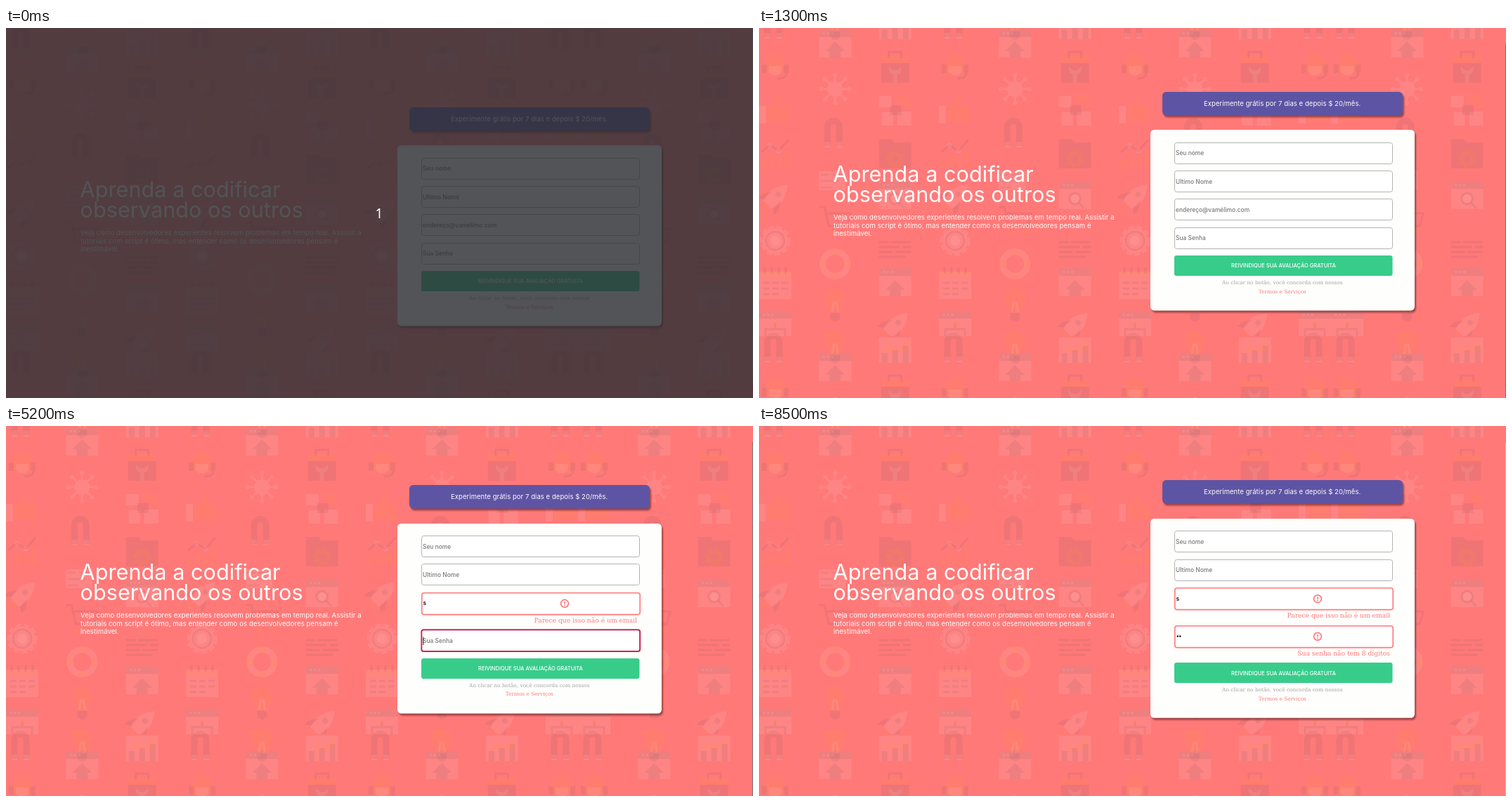
Recreate the animation shown at these times as an HTML page. Size 1063x527 px, loop 9.5 s.

```html
<!DOCTYPE html>
<html lang="pt-BR">
<head>
<meta charset="utf-8">
<title>Formulário de cadastro</title>
<style>
  html, body { margin: 0; width: 100%; height: 100%; overflow: hidden; background: #ff7979; }
  svg { display: block; width: 100vw; height: 100vh; }
  text { font-family: Inter, sans-serif; font-optical-sizing: none; white-space: pre; }
  .serif { font-family: "DejaVu Serif", serif; }
  .title { font-size: 30.6px; letter-spacing: .05px; fill: #fffdfb; }
  .lead { font-size: 9.6px; letter-spacing: .09px; fill: #fffdfb; }
  .offer { font-size: 9.45px; letter-spacing: .09px; fill: #fffdfb; text-anchor: middle; }
  .hint { font-size: 8.35px; font-weight: 500; letter-spacing: .04px; fill: #757575; }
  .typed { font-size: 8.35px; font-weight: 600; fill: #111; }
  .cta { font-size: 7.5px; font-weight: 500; fill: #fff; text-anchor: middle; }
  .terms { font-size: 7.37px; fill: #a3a3a3; text-anchor: middle; }
  .link { fill: #ff7979; }
  .error { font-size: 9.18px; fill: #ff7979; text-anchor: end; }
  .count { font: 19px "Noto Sans", sans-serif; fill: #fff; text-anchor: middle; }
  .shadow { filter: drop-shadow(2.4px 3.4px 1.1px rgba(60, 10, 10, .48)); }
  .line { fill: none; }
  .l { fill: rgba(255, 255, 255, .085); }
  .d { fill: rgba(110, 75, 85, .11); }
  .o { fill: rgba(255, 150, 50, .13); }
  .ls, .ds, .os { fill: none; stroke-width: 3; }
  .ls { stroke: rgba(255, 255, 255, .085); }
  .ds { stroke: rgba(110, 75, 85, .11); }
  .os { stroke: rgba(255, 150, 50, .13); }
  .fat { stroke-width: 9; }
</style>
</head>
<body>
<svg viewBox="0 0 1063 527" preserveAspectRatio="none">
  <defs>
    <pattern id="tile" width="814" height="461" patternUnits="userSpaceOnUse"></pattern>
  </defs>
  <rect width="1063" height="527" fill="#ff7979"/>
  <g id="page">
    <rect width="1063" height="560" fill="url(#tile)"/>
    <text class="title" x="105.5" y="241">Aprenda a codificar</text>
    <text class="title" x="105.5" y="270">observando os outros</text>
    <text class="lead" x="106" y="295">Veja como desenvolvedores experientes resolvem problemas em tempo real. Assistir a</text>
    <text class="lead" x="106" y="306.5">tutoriais com script é ótimo, mas entender como os desenvolvedores pensam é</text>
    <text class="lead" x="106" y="318">inestimável.</text>
  </g>
  <g id="form"></g>
  <rect id="thumb" x="1062" width="1" height="504"/>
  <g id="intro">
    <rect width="1063" height="527" fill="rgb(44,47,52)" fill-opacity=".82"/>
    <text class="count" x="531" y="270.5">1</text>
  </g>
</svg>
<script>
const $ = id => document.getElementById(id);
const shape = (cls, d) => `<path class="${cls}" d="${d}"/>`;
const disc = (cls, x, y, r, extra = '') => `<circle class="${cls}" cx="${x}" cy="${y}" r="${r}" ${extra}/>`;
const text = (cls, x, y, s) => `<text class="${cls}" x="${x}" y="${y}">${s}</text>`;
const box = (x, y, w, h, r, attrs) =>
  `<rect x="${x}" y="${y}" width="${w}" height="${h}" rx="${r}" ${attrs}/>`;

// Faint icons of the wallpaper, each about 46 units wide
const win = shape('l', 'M0 0h46v40H0z') + shape('d', 'M0 0h46v11H0z') +
  [7, 13, 19].map(x => disc('l', x, 5.5, 1.8)).join('');
const rays = [0, 1, 2, 3, 4, 5, 6, 7].map(i => {
  const a = i * Math.PI / 4, c = Math.cos(a), s = Math.sin(a);
  return shape('ls', `M${23 + 11 * c} ${23 + 11 * s}L${23 + 17 * c} ${23 + 17 * s}`) +
    disc('l', 23 + 20 * c, 23 + 20 * s, 3);
}).join('');
const icons = {
  house: win + shape('d', 'M9 31 23 17 37 31h-6v9H15V31z'),
  site: win + shape('ds', 'M23 17v8M9 37V26h28v11') + disc('o', 23, 17, 4),
  lens: win + disc('ds', 23, 25, 8) + shape('ds', 'M29 31l7 8') + disc('l', 23, 25, 6),
  headset: shape('o', 'M8 22a15 18 0 0 1 30 0l-3 10H11z') + shape('l', 'M14 22h18v9q-9 9-18 0z') +
    shape('d', 'M4 20h7v12H4zM35 20h7v12h-7z') + shape('ds', 'M39 32q0 8-13 8'),
  thumb: shape('o', 'M12 20 22 16 26 2q7 0 5 9l-1 7h14v24H12z') + shape('l', 'M0 19h10v25H0z'),
  chart: shape('o', 'M2 32h7v12H2zM14 26h7v18h-7zM26 30h7v14h-7zM37 19h7v25h-7z') +
    shape('ds', 'M3 22 15 12 28 20 42 4') + disc('l', 15, 12, 3.5) + disc('l', 28, 20, 3.5),
  rocket: `<g transform="rotate(45 23 23)">${shape('l', 'M23-2q17 20 8 40H15Q6 18 23-2z')}${
    shape('d', 'M14 20 6 34v8l8-6zM32 20l8 14v8l-8-6z')}${disc('d', 23, 17, 4)}${shape('o', 'M17 39h12l-6 11z')}</g>`,
  bars: shape('l', 'M0 8h46v36H0z') + shape('o', 'M4 30 15 18 26 24 42 8v20H4z') +
    shape('d', 'M4 30h8v14H4zM19 26h8v18h-8zM34 20h8v24h-8z'),
  badge: disc('ls', 23, 23, 20, 'stroke-dasharray="8 4"') + disc('l', 23, 23, 18) +
    disc('ds', 23, 23, 13) + disc('l', 23, 23, 7),
  calendar: shape('l', 'M0 6h46v39H0z') + shape('o', 'M0 6h46v9H0z') + shape('ds', 'M8 0v9M18 0v9M28 0v9M38 0v9') +
    shape('ds', 'M6 22h9m4 0h9m4 0h9M6 30h9m4 0h9m4 0h9M6 38h9m4 0h9'),
  magnet: shape('ds fat', 'M12 41V14a8 8 0 0 1 17 0v27') +
    shape('l', 'M8 35h8v8H8zM25 35h8v8h-8z') + shape('os', 'M5 36l-5 3M6 43l-4 3M36 36l5 3M35 43l4 3'),
  splat: rays + disc('l', 23, 23, 11),
  list: shape('ds', 'M2 3h12m4 0h18M2 12h26M2 21h16') + shape('l', 'M0-2h38v27H0z'),
  cart: shape('ds', 'M0 4h8l6 27h27l5-18H10') + disc('o', 18, 40, 4) + disc('o', 37, 40, 4),
  buoy: disc('ls fat', 23, 23, 17.5) +
    disc('os fat', 23, 23, 17.5, 'stroke-dasharray="13.74" stroke-dashoffset="6.87"'),
  bulb: shape('o', 'M16 34q0-5-5-10a15 15 0 1 1 24 0q-5 5-5 10z') + shape('d', 'M16 35h14v8q-7 8-14 0z') +
    shape('ls', 'M19 33l2-13h4l2 13'),
  tray: shape('l', 'M0 7h46v6H0z') + shape('o', 'M4 4q18-7 22 3H4z'),
  toolbox: shape('ds', 'M14 12V3h18v9') + shape('d', 'M3 19h40v28H3z') + shape('o', 'M3 9h40v10H3z') +
    shape('l', 'M14 24q0 11 6 11v12h6V35q6 0 6-11l-6 5h-6z'),
  papers: shape('l', 'M0 3h18v16H0zM4 26h16v19H4zM26 25h20v20H26z') +
    shape('o', 'M24 2h12q9 4 9 17l-9-4q-8 0-12-13z') + shape('d', 'M16 16h16v14H16z'),
  folder: shape('d', 'M0 2h18l4 5h24v8H0z') + shape('d', 'M0 15h46v29H0z') +
    disc('os', 23, 31, 8, 'style="stroke-width:6"') + disc('os', 23, 31, 12, 'stroke-dasharray="5 4.4"'),
  lines: shape('ds', 'M0 2h14m3 0h28M0 9h30m4 0h12M0 16h20m3 0h23M0 23h38')
};

const columns = [
  'magnet -6 headset 54 thumb 114 chart 177 rocket 240 badge 302 calendar 363 site 425',
  'bulb -8 house 24 splat 86 magnet 149 list 228 cart 273 buoy 335 bulb 393 tray 455',
  'bars -6 toolbox 53 papers 116 folder 178 lens 240 lines 325 house 364 rocket 423'
].map(s => s.match(/[a-z]+ -?\d+/g).map(p => p.split(' ')));

let art = '';
for (let c = 0; c < 10; c++) {
  for (const [name, y] of columns[c % 3]) {
    const put = dy => art += `<g transform="translate(${(c * 256 / 3).toFixed(1)} ${+y + dy})">${icons[name]}</g>`;
    put(0);
    if (y < 0) put(461);
  }
}
$('tile').innerHTML = art;

const HINTS = ['Seu nome', 'Ultimo Nome', 'endereço@vamélimo.com', 'Sua Senha'];
const ERRORS = { 2: 'Parece que isso não é um email', 3: 'Sua senha não tem 8 dígitos' };
const PITCH = 40.35, ERROR_H = 13.2;

// Boxes sit on whole pixels, text does not
function field(i, y, s) {
  const bad = s.bad[i], value = s.value[i], mid = y + 15.7, top = Math.round(y);
  let out = bad
    ? box(591.8, top + .8, 310.4, 30.8, 3, 'fill="#fff" stroke="#ff7979" stroke-width="1.6"')
    : box(591.5, top + .5, 310, 30, 3, 'fill="#fff" stroke="#b3b3b3"');
  if (s.focus === i) {
    const h = bad ? 32 : 31;
    out += box(591.3, top + .3, 310.9, h - .3, 3, 'class="line" stroke="#c9274f" stroke-width="1.9"');
    if (s.tint) out += box(591.9, top + .9, 310.9, h - .3, 3, `class="line" stroke="#5e54a4" stroke-width="1.4" opacity="${s.tint}"`);
  }
  if (!value) out += text('hint', 593, mid + 3, HINTS[i]);
  else if (i === 2) out += text('typed', 593.6, mid + 3, value);
  else for (let k = 0; k < value.length; k++) out += disc('', 595.8 + k * 3.4, mid + .2, 1.25, 'fill="#111"');
  if (s.focus === i && s.caret) {
    const x = value ? (i === 2 ? 598 : 594.5 + value.length * 3.4) : 593.4;
    out += box(x, mid - 5.5, .9, 11.5, 0, 'fill="#111"');
  }
  if (bad) {
    out += disc('line', 795, mid + .4, 5.4, 'stroke="#ff7979" stroke-width="1.7"') +
      `<path d="M795 ${mid - 2.6}v3.8m0 1.1v1.6" stroke="#ff7979" stroke-width="1.6"/>` +
      text('serif error', 898, y + 43.2, ERRORS[i]);
  }
  return out;
}

function formMarkup(s) {
  const errors = s.bad.filter(Boolean).length;
  const base = -s.scroll - errors * ERROR_H / 2;
  const at = y => Math.round(base + y);
  let y = base + 184.6, rows = '';
  for (let i = 0; i < 4; i++) {
    rows += field(i, y, s);
    y += PITCH + (s.bad[i] ? ERROR_H : 0);
  }
  return box(574, at(112.6), 342, 33.5, 5.5, 'fill="#5e54a4" class="shadow"') +
    text('offer', 744.7, base + 132.6, 'Experimente grátis por 7 dias e depois $ 20/mês.') +
    box(557, at(167.4), 376, 257.4 + errors * ERROR_H, 5.5, 'fill="#fefefc" class="shadow"') + rows +
    box(591, Math.round(y), 310.5, 29, 3, 'fill="#38cc8b"') +
    text('cta', 746.5, y + 17.3, 'REIVINDIQUE SUA AVALIAÇÃO GRATUITA') +
    text('serif terms', 744.8, y + 41.1, 'Ao clicar no botão, você concorda com nossos') +
    text('serif terms link', 744.8, y + 53.8, 'Termos e Serviços');
}

const clamp = v => Math.max(0, Math.min(1, v));
const smooth = v => v * v * (3 - 2 * v);

function stateAt(t) {
  const email = t >= 1400 && t < 4200, pass = t >= 5200 && t < 6500;
  const since = email ? t - 1400 : t - 5200;
  return {
    scroll: Math.round(22 * smooth(clamp((t - 400) / 300))),
    focus: email ? 2 : pass ? 3 : -1,
    tint: +clamp(since / 300).toFixed(2),
    caret: email ? t >= 1700 && t < 2500 || t >= 3200 : t < 6400,
    value: ['', '', t >= 3200 ? 's' : '', t >= 6200 ? '••' : t >= 6000 ? '•' : ''],
    bad: [false, false, t >= 3400, t >= 6000]
  };
}

let shown = '';
function render(ms) {
  const t = Math.floor(ms / 100) * 100;
  const state = stateAt(t), key = JSON.stringify(state);
  $('thumb').setAttribute('fill', t >= 1300 && t < 8500 ? '#787878' : '#c1c1c1');
  $('intro').setAttribute('visibility', t < 100 ? 'visible' : 'hidden');
  if (key === shown) return;
  shown = key;
  $('page').setAttribute('transform', `translate(0 ${-state.scroll})`);
  $('thumb').setAttribute('y', state.scroll * 23 / 22);
  $('form').innerHTML = formMarkup(state);
}

const start = performance.now();
function tick() {
  render((performance.now() - start) % 9500);
  requestAnimationFrame(tick);
}
tick();
</script>
</body>
</html>
```
